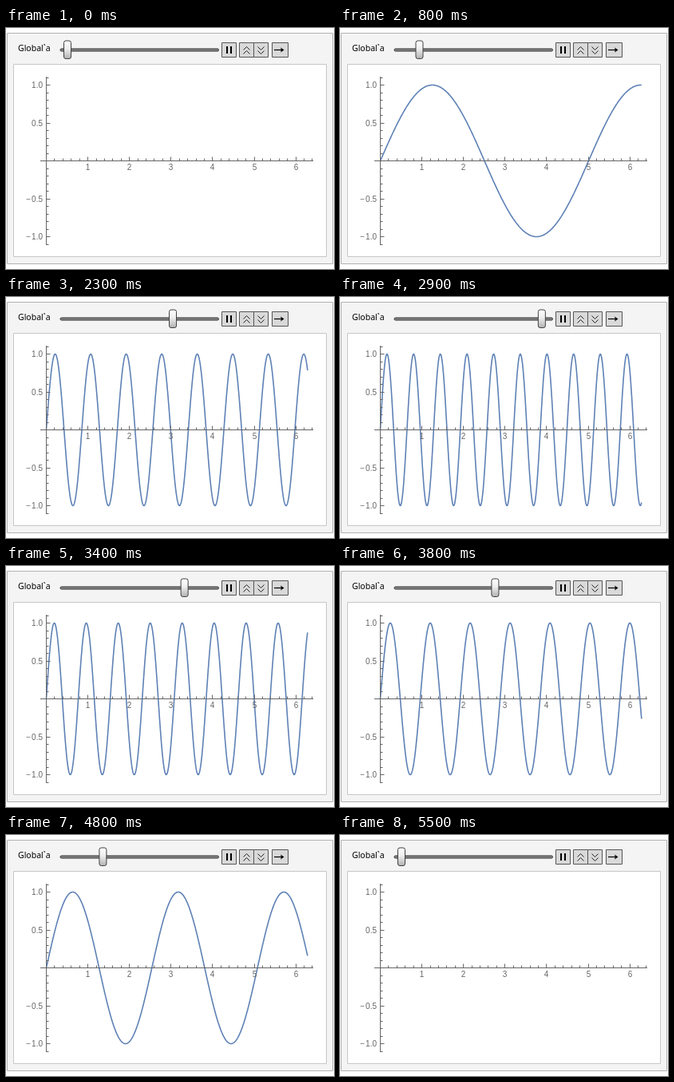
Write an HTML page with a canvas that moves like this. It is 411 px wide and 302 px high and loops after 6000 ms.

```html
<!DOCTYPE html>
<html lang="en">
<head>
<meta charset="utf-8">
<title>Sine slider</title>
<style>
  html, body { margin: 0; width: 100%; height: 100%; overflow: hidden; background: #fff; }
  canvas { display: block; }
</style>
</head>
<body>
<canvas id="stage" width="411" height="302"></canvas>
<script>
const ctx = document.getElementById('stage').getContext('2d');
const LOOP = 6000, STEP = 100, LAST = LOOP / STEP - 1;
const ORIGIN = { x: 50.5, y: 166.5 }, UNIT = { x: 52.1, y: 95 };

function rect(x, y, w, h, fill, stroke, radius = 0) {
  ctx.beginPath();
  ctx.roundRect(x, y, w, h, radius);
  ctx.fillStyle = fill;
  ctx.fill();
  ctx.strokeStyle = stroke;
  ctx.lineWidth = 1;
  ctx.stroke();
}

function polyline(points, color, width) {
  ctx.beginPath();
  points.forEach(([x, y]) => ctx.lineTo(x, y));
  ctx.strokeStyle = color;
  ctx.lineWidth = width;
  ctx.stroke();
}

function text(str, x, y, align, font, color) {
  ctx.font = font;
  ctx.textAlign = align;
  ctx.fillStyle = color;
  ctx.fillText(str, x, y);
}

// Triangle wave from -2 to 10 and back, clamped at zero.
function parameterAt(time) {
  const step = Math.floor((time % LOOP) / STEP);
  return Math.max(0, 10 - 12 * Math.abs(1 - 2 * step / LAST));
}

function drawPanel() {
  ctx.fillStyle = '#fff';
  ctx.fillRect(0, 0, 411, 302);
  rect(1.5, 6.5, 408, 289, '#f4f4f4', '#b2b2b2');
  rect(9.5, 45.5, 392, 241, '#fff', '#c6c6c6');
  text('Global`a', 15, 29, 'left', '10.5px "Noto Sans", sans-serif', '#000');
}

function drawSlider(a) {
  rect(68, 26, 198.5, 3, '#8c8c8c', '#2e2e2e', 1.5);
  const x = 77 + 17.95 * a;
  const shade = ctx.createLinearGradient(0, 16, 0, 38);
  shade.addColorStop(0, '#fff');
  shade.addColorStop(0.45, '#eee');
  shade.addColorStop(1, '#b4b4b4');
  rect(x - 4.5, 16, 9, 22.5, shade, '#404040', 2.5);
}

function chevrons(x, dir) {
  for (const y of [25.5, 30.5]) {
    polyline([[x - 4, y + 2 * dir], [x, y - 2 * dir], [x + 4, y + 2 * dir]], '#222', 1);
  }
}

function drawButtons() {
  for (const [x, w] of [[270.5, 18], [292.5, 18], [310.5, 18], [333.5, 20]]) {
    rect(x, 18.5, w, 18, '#d9d9d9', '#555');
  }
  ctx.fillStyle = '#000';
  ctx.fillRect(276, 23, 2, 9);
  ctx.fillRect(281, 23, 2, 9);
  chevrons(301.5, 1);
  chevrons(319.5, -1);
  polyline([[336, 27.5], [347, 27.5]], '#000', 1.2);
  ctx.beginPath();
  ctx.moveTo(348.5, 27.5);
  ctx.lineTo(344, 24.5);
  ctx.lineTo(345, 27.5);
  ctx.lineTo(344, 30.5);
  ctx.fill();
}

function drawCurve(a) {
  const points = [], samples = 700;
  for (let i = 0; i <= samples; i++) {
    const x = 2 * Math.PI * i / samples;
    points.push([ORIGIN.x + UNIT.x * x, ORIGIN.y - UNIT.y * Math.sin(a * x)]);
  }
  ctx.lineJoin = 'round';
  polyline(points, '#5e81b5', 1.6);
  ctx.lineJoin = 'miter';
}

function drawAxes() {
  const ink = '#666', font = '10px "Liberation Sans", Arial, sans-serif';
  polyline([[43, ORIGIN.y], [385, ORIGIN.y]], ink, 1);
  polyline([[ORIGIN.x, 61], [ORIGIN.x, 272]], ink, 1);

  for (let i = 1; i <= 32; i++) {
    const major = i % 5 === 0;
    const x = Math.floor(ORIGIN.x + UNIT.x * i / 5) + 0.5;
    polyline([[x, ORIGIN.y], [x, ORIGIN.y - (major ? 5 : 3)]], ink, 1);
    if (major) text(String(i / 5), x, 178, 'center', font, ink);
  }
  for (let i = -11; i <= 11; i++) {
    const major = i % 5 === 0;
    const y = Math.floor(ORIGIN.y - UNIT.y * i / 10) + 0.5;
    polyline([[ORIGIN.x, y], [ORIGIN.x + (major ? 5 : 3), y]], ink, 1);
    if (major && i) {
      text(Math.abs(i / 10).toFixed(1), 46, y + 3.5, 'right', font, ink);
      if (i < 0) text('−', 31, y + 3.5, 'right', font, ink);
    }
  }
}

function draw(time) {
  const a = parameterAt(time);
  drawPanel();
  drawSlider(a);
  drawButtons();
  if (a > 0) drawCurve(a);
  drawAxes();
}

const start = performance.now();
function tick() {
  draw(performance.now() - start);
  requestAnimationFrame(tick);
}
tick();
</script>
</body>
</html>
```
